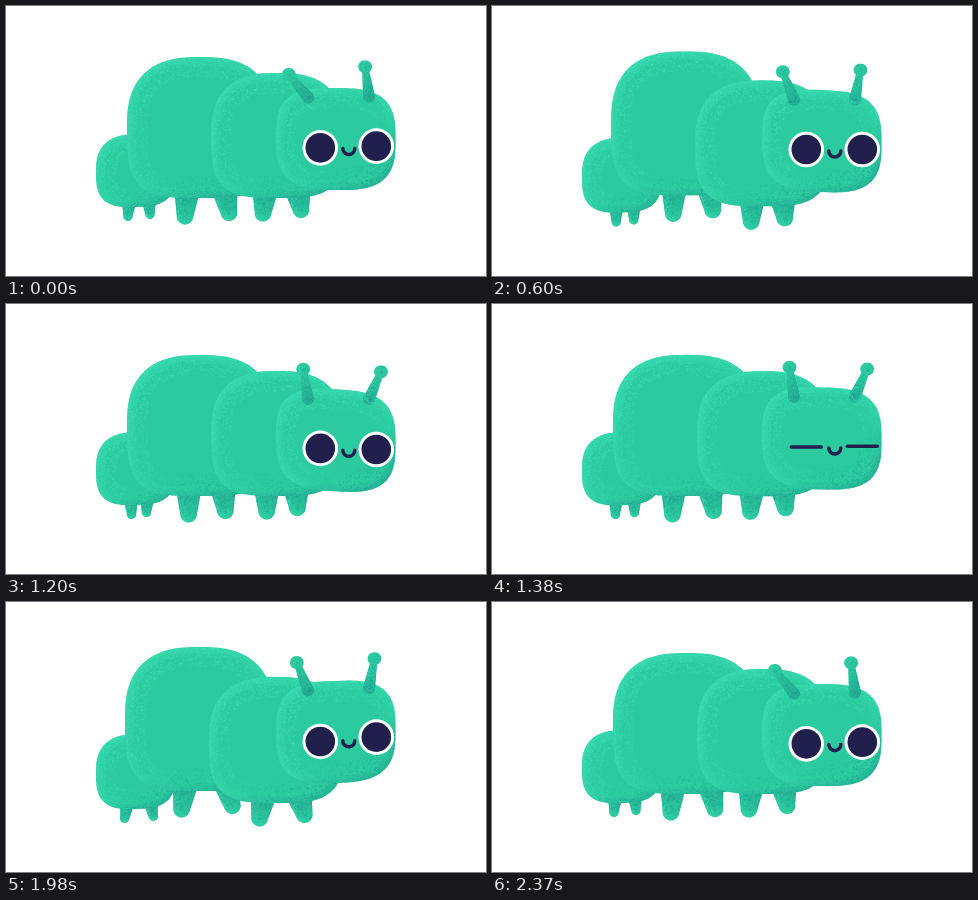
An HTML page with a canvas for the animation above (2.4 s loop, 480 px wide and 270 px high).

```html
<!DOCTYPE html>
<html lang="en">
<head>
<meta charset="utf-8">
<title>Caterpillar</title>
<style>
html, body { margin: 0; width: 100%; height: 100%; overflow: hidden; background: #fff; }
canvas { display: block; width: 480px; height: 270px; }
</style>
</head>
<body>
<canvas id="stage" width="480" height="270"></canvas>
<script>
const ctx = document.getElementById('stage').getContext('2d');
const LOOP = 2400, REST = 2370;
const BODY = '#2bcb9f', NAVY = '#21204d';
const light = a => `rgba(62, 224, 184, ${a})`;
const dark = a => `rgba(28, 155, 138, ${a})`;

// Moments at which the pose is redrawn.
const STEPS = [0, 210, 390, 600, 810, 990, 1200, 1290, 1380, 1500, 1590,
  1800, 1890, 1980, 2100, 2190, 2280, REST];

// Boxes are left, top, right, bottom; round holds the corner exponents of top and bottom.
// Each leg is its hip x, foot x and length.
const SEGMENTS = [
  { low: [90, 128, 170, 201], high: [90, 132, 170, 207], round: [2.6, 3], tilt: -0.03,
    thick: [7, 4.6], legs: [[123, 122, 14], [143, 144, 12]] },
  { low: [121, 51, 268, 192], high: [119, 45, 268, 189], round: [2.6, 3.6], tilt: 0,
    thick: [12.5, 8.3], legs: [[181, 179, 26.5], [219, 223, 23]] },
  { low: [205, 67, 338, 192], high: [203, 75, 338, 201], round: [2.6, 3.4], tilt: 0,
    thick: [12.5, 8.3], legs: [[259, 257, 23.5], [292, 295, 20]] }
];
const HEAD = [270, 82, 389.5, 184];

const mix = (a, b, k) => a + (b - a) * k;
const ease = k => k * k * (3 - 2 * k);
const hump = (u, peak) => Math.sin(Math.PI * Math.pow(u, Math.log(0.5) / Math.log(peak)));

function poseAt(t) {
  // Two body stretches per loop, the first peaking early and the second late.
  const bob = t < 1200 ? hump(t / 1200, 0.4) : hump((t - 1200) / (REST - 1200), 0.65);
  const nod = t < 1100 ? ease(t / 1100)
    : t < 1850 ? mix(1, -1, ease((t - 1100) / 750))
    : mix(-1, 0, ease((t - 1850) / (REST - 1850)));
  const lid = Math.min(1, Math.abs(t - 1390) / 190);
  return { stretch: bob * bob, nod, sway: hump(t / REST, 0.56), lid: lid < 0.1 ? 0 : lid };
}

function random(seed) {
  return () => {
    seed = seed + 0x6D2B79F5 | 0;
    let x = Math.imul(seed ^ seed >>> 15, 1 | seed);
    x = x + Math.imul(x ^ x >>> 7, 61 | x) ^ x;
    return ((x ^ x >>> 14) >>> 0) / 4294967296;
  };
}

// Superellipse filling a box, counterclockwise from the top.
function pebble([l, t, r, b], [top, bottom], tilt) {
  const cx = (l + r) / 2, cy = (t + b) / 2;
  return Array.from({ length: 160 }, (_, i) => {
    const a = i / 160 * Math.PI * 2, s = -Math.sin(a), c = -Math.cos(a);
    const p = 2 / (c < 0 ? top : bottom);
    const x = Math.sign(s) * Math.pow(Math.abs(s), p) * (r - l) / 2;
    const y = Math.sign(c) * Math.pow(Math.abs(c), p) * (b - t) / 2;
    return [cx + x, cy + y + tilt * x];
  });
}

// Tapered capsule from radius r at (x, y) to radius s at (u, v).
function taper(x, y, r, u, v, s) {
  const turn = Math.atan2(v - y, u - x) + Math.PI / 2;
  return Array.from({ length: 40 }, (_, i) => {
    const a = turn - i % 20 / 19 * Math.PI - (i < 20 ? 0 : Math.PI);
    return i < 20 ? [u + s * Math.cos(a), v + s * Math.sin(a)] : [x + r * Math.cos(a), y + r * Math.sin(a)];
  });
}

function gradient(x, y, u, v, from, to) {
  const g = ctx.createLinearGradient(x, y, u, v);
  g.addColorStop(0, from);
  g.addColorStop(1, to);
  return g;
}

// Fills the outline, then draws the shading clipped to it.
function blob(line, shade) {
  ctx.save();
  ctx.beginPath();
  line.forEach(p => ctx.lineTo(p[0], p[1]));
  ctx.closePath();
  ctx.fillStyle = BODY;
  ctx.fill();
  ctx.clip();
  shade();
  ctx.restore();
}

// A soft rim with speckles that thin out inward.
function rim(line, rnd, paint, width, depth, density) {
  ctx.strokeStyle = ctx.fillStyle = paint;
  for (let k = 1; k <= 3; k++) {
    ctx.globalAlpha = 0.22;
    ctx.lineWidth = width * k;
    ctx.stroke();
  }
  ctx.globalAlpha = 0.6;
  line.forEach(([x, y], i) => {
    const [u, v] = line[(i + 1) % line.length];
    const dx = u - x, dy = v - y, len = Math.hypot(dx, dy);
    for (let n = Math.floor(len * density + rnd()); n > 0; n--) {
      const s = rnd(), d = depth * Math.pow(rnd(), 1.4) / len, size = 0.7 + rnd() * 0.7;
      ctx.fillRect(x + dx * s + dy * d, y + dy * s - dx * d, size, size);
    }
  });
  ctx.globalAlpha = 1;
}

function segment(box, round, tilt, rnd) {
  const [l, t, r, b] = box, line = pebble(box, round, tilt);
  const w = r - l, h = b - t;
  blob(line, () => {
    rim(line, rnd, gradient(l + w * 0.3, t, r, b, light(0.9), light(0)), 6, 20, 5);
    rim(line, rnd, gradient(l + w * 0.55, t + h * 0.62, l + w * 0.8, b + 4, dark(0), dark(0.85)), 5, 23, 5);
  });
}

function leg(hip, foot, bottom, length, [wide, thin], rnd) {
  const end = bottom + length;
  const line = taper(hip, bottom - 6, wide, foot, end - thin, thin);
  blob(line, () => {
    const shade = gradient(foot, bottom - 6, foot - thin * 0.3, end, dark(0.8), dark(0.05));
    ctx.fillStyle = shade;
    ctx.globalAlpha = 0.45;
    ctx.fill();
    rim(line, rnd, gradient(foot - wide, end, foot + thin, end, light(0.9), light(0)), 1.5, 6, 3);
    rim(line, rnd, shade, 1, wide * 2, 5);
  });
}

function feeler(x, y, angle, rnd) {
  const u = x + 30 * Math.sin(angle), v = y - 30 * Math.cos(angle);
  const shade = gradient(x, y, u, v, dark(0.8), dark(0.15));
  [taper(x, y, 6, u, v, 3), taper(u - 0.5, v, 6.3, u + 0.5, v, 6.3)].forEach(line => blob(line, () => {
    ctx.fillStyle = shade;
    ctx.globalAlpha = 0.6;
    ctx.fill();
    rim(line, rnd, gradient(u - 7, v, u + 6, v, light(0.7), light(0)), 1, 5, 2);
    rim(line, rnd, shade, 0.7, 9, 2);
  }));
}

function disc(x, y, r, open, color) {
  ctx.beginPath();
  ctx.ellipse(x, y, r, r * open, 0, 0, Math.PI * 2);
  ctx.fillStyle = color;
  ctx.fill();
}

function face(x, y, tilt, open) {
  ctx.strokeStyle = NAVY;
  ctx.lineCap = 'round';
  ctx.lineWidth = 3.5;
  [-28, 28].forEach(side => {
    const ex = x + side, ey = y + side * tilt;
    if (open) {
      disc(ex, ey, 17.8, open, '#fff');
      disc(ex, ey, 14.8, open, NAVY);
      return;
    }
    ctx.beginPath();
    ctx.moveTo(ex - 15, ey);
    ctx.lineTo(ex + 15, ey);
    ctx.stroke();
  });
  ctx.beginPath();
  ctx.arc(x + 0.5, y + 1.4, 6, 0, Math.PI);
  ctx.stroke();
}

function draw(t) {
  const { stretch, nod, sway, lid } = poseAt(t);
  const rnd = random(7);
  ctx.fillStyle = '#fff';
  ctx.fillRect(0, 0, 480, 270);
  SEGMENTS.forEach(({ low, high, round, tilt, thick, legs }) => {
    const box = low.map((v, i) => mix(v, high[i], stretch));
    legs.forEach(([hip, foot, length], i) => {
      const step = (i ? -4 : 4) * nod;
      leg(hip + step / 2, foot + step, box[3], length, thick, rnd);
    });
    segment(box, round, tilt, rnd);
  });
  const drop = 3.7 * nod;
  segment(HEAD.map((v, i) => i % 2 ? v + drop : v), [3.1, 3], 0.01 + 0.05 * nod, rnd);
  feeler(302, 91.5 + drop, -0.69 + 0.54 * sway, rnd);
  feeler(363, 90.5 + drop * 1.4, -0.13 + 0.55 * sway, rnd);
  face(342.3, 141 + 4.4 * nod, -0.03 + 0.055 * nod, lid);
}

const start = performance.now();
let shown = -1;
function tick() {
  const t = (performance.now() - start) % LOOP;
  const step = STEPS.filter(s => s <= t).pop();
  if (step !== shown) draw(shown = step);
  requestAnimationFrame(tick);
}
tick();
</script>
</body>
</html>
```
